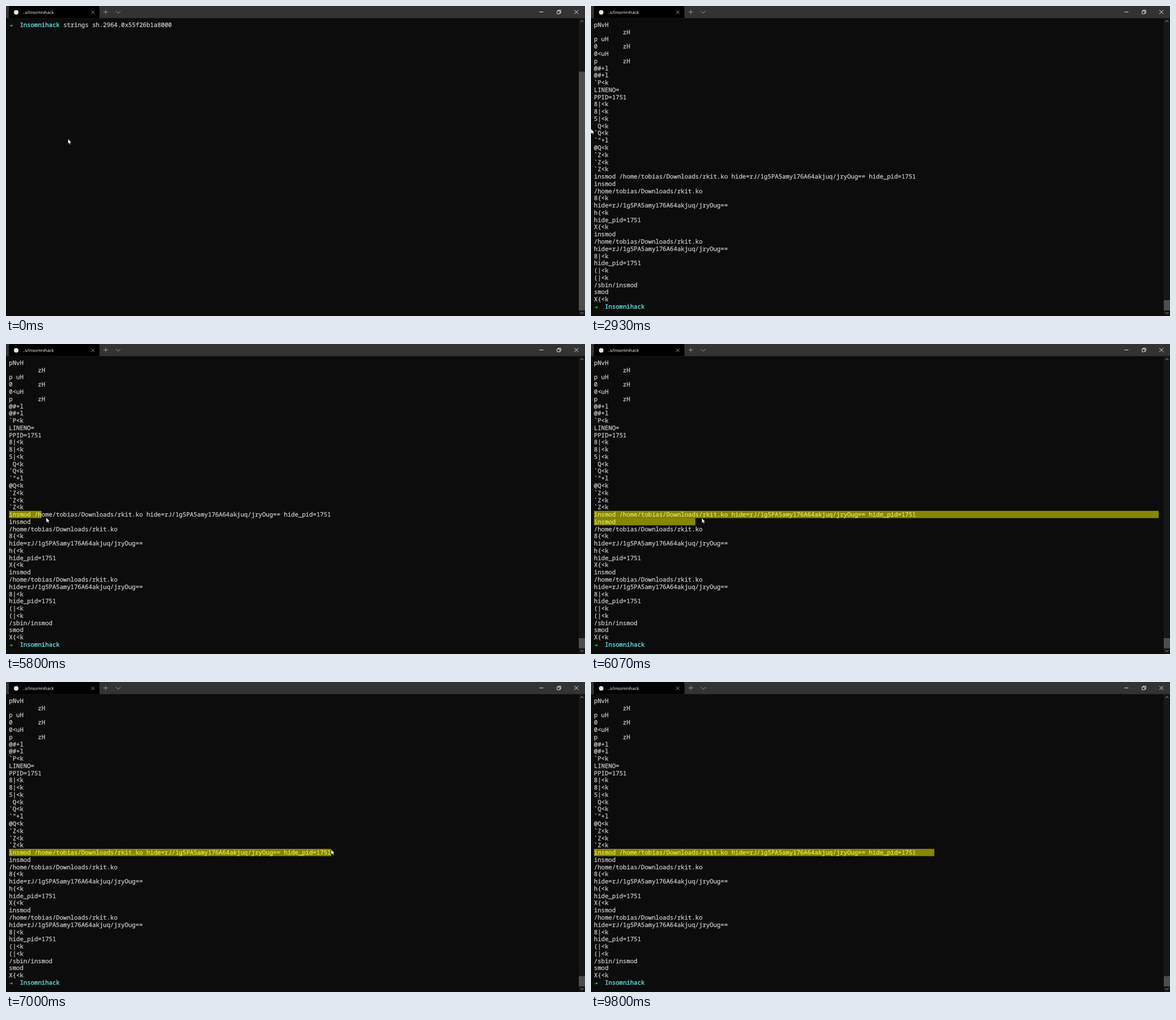
Recreate the animation shown at these times as an HTML page. Size 1022x548 px, loop 9990 ms.

```html
<!DOCTYPE html>
<html lang="en">
<head>
<meta charset="utf-8">
<title>Terminal</title>
<style>
  html, body { margin: 0; width: 100%; height: 100%; overflow: hidden; background: #0c0c0c; }
  svg { display: block; width: 100vw; height: 100vh; }
  text { white-space: pre; text-rendering: geometricPrecision; }
  .row {
    font: 10.65px "Noto Sans Mono", "DejaVu Sans Mono", monospace;
    font-variant-ligatures: none;
    fill: #ccc; stroke: #ccc; stroke-width: .25;
  }
  .dir { fill: #61d6d6; stroke: #61d6d6; stroke-width: .4; }
  .title { font: 7.5px "Open Sans", "Noto Sans", sans-serif; fill: #fff; }
  .line { fill: none; stroke-width: .85; }
</style>
</head>
<body>
<svg viewBox="0 0 1022 548" preserveAspectRatio="none">
  <rect width="1022" height="548" fill="#0c0c0c"/>
  <rect width="1022" height="21.5" fill="#333"/>
  <path d="M5 21.5V3Q5 0 8 0H162Q165 0 165 3V21.5Z" fill="#000"/>
  <circle cx="18" cy="11.2" r="4" fill="#e9e4d4"/>
  <text id="title" class="title" x="29.5" y="13.7"></text>
  <path class="line" stroke="#a8a8a8" d="M150.2 8.1l6 6m0-6l-6 6M172 10.5h8m-4-4v8M194 8.8l4.1 4.1l4.1-4.1"/>
  <path class="line" stroke="#fff" d="M941.5 10.5h7M972.8 8.9h4.9v4.9h-4.9zM974.3 8.9v-1.6h5v5h-1.6M1003.3 7l7 7m0-7l-7 7"/>
  <rect x="1011" y="21.5" width="11" height="526.5" fill="#171717"/>
  <rect id="thumb" x="1011" width="11" fill="#4d4d4d"/>
  <path class="line" stroke="#ccc" d="M1013.9 28.3l2.7-2.7l2.7 2.7M1013.9 541.3l2.7 2.7l2.7-2.7"/>
  <g id="screens"></g>
  <rect id="sel1" fill="#ff0" opacity=".5"/>
  <rect id="sel2" fill="#ff0" opacity=".5"/>
  <rect id="caret" width="1" height="13.5" fill="#fff"/>
  <path id="mouse" d="M0 0V8.8L2 7L3.4 10L4.8 9.4L3.5 6.5H6.2Z" fill="#fff" stroke="#000" stroke-width=".5"/>
</svg>
<script>
const LOOP = 9990, STEP = 1000 / 15;
const LEFT = 5.3, TOP = 26.8, CW = 6.39, RH = 12.77, COLS = 156, SEL_ROW = 21;
const $ = id => document.getElementById(id);
const colX = c => LEFT + c * CW;
const rowY = r => TOP + r * RH;

function set(el, attrs) {
  for (const k in attrs) el.setAttribute(k, attrs[k]);
}

function make(tag, parent, attrs, text = '') {
  const el = document.createElementNS('http://www.w3.org/2000/svg', tag);
  set(el, attrs);
  el.textContent = text;
  return parent.appendChild(el);
}

const dump = String.raw`AUATA
tOM9
[]A\A]
AVAUATUSH
4$tY
[]A\A]A^A_
AWAVE
AUATI
[]A\A]A^A_
AWAVAUATUSH
<?t.<[
[]A\A]A^A_
H9-{A!
={@!
AVAUH
ATUSH
[]A\A]A^
[]A\A]A^
t/;x
[]A\
-lD!
9-^>!
[]A\
ATUA
=r=!
-OC!
[]A\
AWAVAUATUSH
Dd$(
L$ H
|$ H
8[]A\A]A^A_
8[]A\A]A^A_
L$ H
<0I9
=y:!
->@!
AWAVAUATA
[]A\A]A^A_
L+-I5!`.split('\n');

const path = '/home/tobias/Downloads/rkit.ko';
const key = 'hide=rJ/1g5PA5amy176A64akjuq/jryOug==';
const pid = 'hide_pid=1751';
const tail = [
  'pNvH', '        zH', 'p uH', '0       zH', '0<uH', 'p       zH',
  '@#+l', '@#+l', '`P<k', 'LINENO=', 'PPID=1751', '8|<k', '8|<k', '5|<k',
  ' Q<k', '`Q<k', '`"+l', '@Q<k', '`Z<k', '`Z<k', '`Z<k',
  `insmod ${path} ${key} ${pid}`,
  'insmod', path, '8{<k', key, 'h{<k', pid, 'X{<k',
  'insmod', path, key, '8|<k', pid, '(|<k', '(|<k',
  '/sbin/insmod', 'smod', 'X{<k'
];

function write(g, row, col, text, cls = '') {
  make('text', g, { class: 'row ' + cls, x: colX(col), y: rowY(row) + 10.1 }, text);
}

function screen(lines) {
  const g = make('g', $('screens'), {});
  lines.forEach((s, r) => write(g, r, 0, s));
  return g;
}

function prompt(g, row, command) {
  make('path', g, {
    d: `M6 ${rowY(row) + 7.5}h3.2v-2l3 2.5l-3 2.5v-2h-3.2z`, fill: '#16c60c'
  });
  write(g, row, 3, 'Insomnihack', 'dir');
  write(g, row, 15, command);
}

const cwd = '..s/Insomnihack';
const views = [
  { from: 0, title: cwd, thumb: 116, lines: [] },
  { from: 1860, title: 'strings', thumb: 116, lines: dump },
  { from: 1930, title: 'strings', thumb: 420, lines: dump.map((_, i) => dump[(i * 7 + 5) % dump.length]) },
  { from: 1995, title: cwd, thumb: 520, lines: tail }
];
for (const v of views) v.group = screen(v.lines);
prompt(views[0].group, 0, 'strings sh.2964.0x55f26b1a8000');
prompt(views[3].group, 39, '');

const smooth = k => k * k * (3 - 2 * k);
const linear = k => k;
const home = { x: 109.5, y: 235 };
const drag = { from: 5663, to: 6877, x: 574, y: 296.3, ease: linear, sag: 8.25 };
const glides = [
  { from: 2735, to: 2930, x: 0, y: 217 },
  { from: 2930, to: 3110, x: 12, y: 530 },
  { from: 3110, to: 3200, x: 22, y: 318 },
  { from: 3935, to: 4333, x: 119, y: 304 },
  { from: 4333, to: 4733, x: 6.5, y: 292.5 },
  { from: 5067, to: 5400, x: 7, y: 301 },
  drag,
  { from: 7133, to: 7400, x: 601.7, y: 296.3 },
  { from: 7667, to: 8533, x: 40, y: 560, ease: linear }
];

function pointer(t) {
  let { x, y } = home;
  for (const g of glides) {
    if (t <= g.from) break;
    const k = Math.min(1, (t - g.from) / (g.to - g.from));
    const e = (g.ease || smooth)(k);
    x += (g.x - x) * e;
    y += (g.y - y) * e + (g.sag || 0) * Math.sin(Math.PI * k ** .6);
  }
  return [x, y];
}

function drawSelection(t) {
  // The highlight trails the pointer and freezes on release.
  const lag = Math.min(t - 31, 7450);
  let first = 0, second = 0;
  if (lag > drag.from - 30) {
    const [x, y] = pointer(lag);
    first = Math.floor((x - LEFT) / CW) + 1;
    if (y > rowY(SEL_ROW + 1)) [first, second] = [COLS, first];
  }
  [first, second].forEach((n, i) =>
    set($('sel' + (i + 1)), { x: LEFT, y: rowY(SEL_ROW + i), width: n * CW, height: RH }));
}

function caretAt(t) {
  if (t < 1395) return null;
  if (t < 1860) return [46, 0];
  if (t < 1995) return [0, 39];
  const blink = Math.floor((t - 2445) / 548);
  return t < 9795 && blink % 2 ? [15, 39] : null;
}

function draw(time) {
  const t = Math.floor((time + 4) / STEP) * STEP;
  const view = views.filter(v => v.from <= t).pop();
  for (const v of views) v.group.style.display = v === view ? '' : 'none';
  $('title').textContent = view.title;
  set($('thumb'), { y: view.thumb, height: 538 - view.thumb });

  const c = caretAt(t);
  $('caret').style.display = c ? '' : 'none';
  if (c) set($('caret'), { x: Math.floor(colX(c[0])), y: rowY(c[1]) - .5 });

  drawSelection(t);
  set($('mouse'), { transform: `translate(${pointer(t)})` });
}

const start = performance.now();
function tick() {
  draw((performance.now() - start) % LOOP);
  requestAnimationFrame(tick);
}
tick();
</script>
</body>
</html>
```
